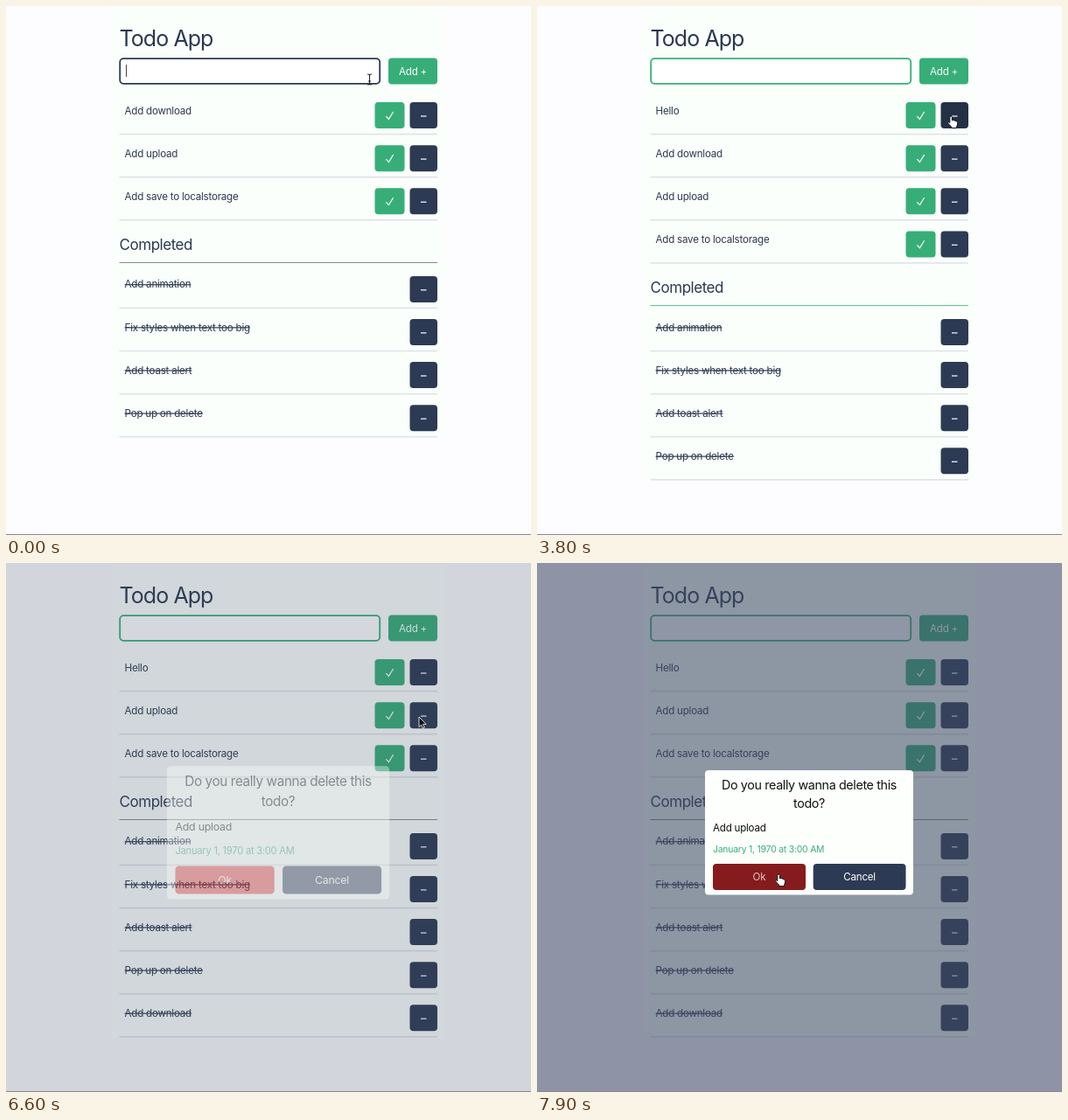
Write an HTML page that moves like this. It is 600 px wide and 605 px high and loops after 8 s.

```html
<!DOCTYPE html>
<html lang="en">
<head>
<meta charset="utf-8">
<title>Todo App</title>
<style>
  html, body { margin: 0; width: 100%; height: 100%; overflow: hidden; background: #fdfcff; }
  svg { display: block; width: 600px; height: 605px; }
  text { font: 11.6px Inter, "Open Sans", sans-serif; letter-spacing: -.02em; fill: #2a3850; white-space: pre; }
  .done { text-decoration: line-through; }
  .btn { fill: #fff; text-anchor: middle; }
</style>
</head>
<body>
<svg id="stage" viewBox="0 0 600 605"></svg>
<script>
const LOOP = 8000, PITCH = 49.1, FADE = 400, SLIDE = -124;
const ADD = 2555, CHECK = 5020, REMOVED = CHECK + FADE, POPUP = 6530;
const NAVY = '#2c3a53', NAVY_HOVER = '#243046';
const GREEN = '#37ae78', GREEN_HOVER = '#2f9868';

const stage = document.getElementById('stage');

function el(parent, tag, attrs = {}, text) {
  const node = document.createElementNS('http://www.w3.org/2000/svg', tag);
  set(node, attrs);
  if (text !== undefined) node.textContent = text;
  parent.appendChild(node);
  return node;
}
function set(node, attrs) {
  for (const k in attrs) node.setAttribute(k, attrs[k]);
}
const rect = (parent, x, y, width, height, fill, rx = 0) =>
  el(parent, 'rect', { x, y, width, height, fill, rx });
const label = (parent, x, y, text, style = '', cls = '') =>
  el(parent, 'text', { x, y, style, class: cls }, text);

const clamp = v => Math.min(1, Math.max(0, v));
const smooth = v => v * v * (3 - 2 * v);

// CSS "ease": cubic-bezier(.25, .1, .25, 1)
function ease(v) {
  v = clamp(v);
  if (v === 0 || v === 1) return v;
  const bez = (a, b, s) => 3 * a * s * (1 - s) ** 2 + 3 * b * s * s * (1 - s) + s ** 3;
  let lo = 0, hi = 1;
  for (let i = 0; i < 24; i++) {
    const mid = (lo + hi) / 2;
    if (bez(.25, .25, mid) < v) lo = mid; else hi = mid;
  }
  return bez(.1, 1, lo);
}

// Page
rect(stage, 0, 0, 600, 605, '#fdfcff');
const card = rect(stage, 121, 0, 381, 494, '#fbfffb');
label(stage, 129.5, 45.5, 'Todo App', 'font-size:25px;letter-spacing:-.037em');
const input = el(stage, 'rect', { x: 130.2, y: 60.2, width: 297, height: 28.6, rx: 4, fill: '#fff', 'stroke-width': 1.8 });
const typed = label(stage, 137, 79, '');
const caret = rect(stage, 137, 67, 1, 14, '#444');
const addBtn = rect(stage, 437, 59.5, 56, 30, GREEN, 4);
const addText = label(stage, 465, 79, 'Add +', '', 'btn');

const heading = el(stage, 'g');
label(heading, 129.5, 279, 'Completed', 'font-size:17px;letter-spacing:-.027em');
const rule = rect(heading, 129.5, 293, 363.5, 1, '#858c8c');

// Rows have their bottom line at y = 0
function makeRow(text, done) {
  const g = el(stage, 'g');
  rect(g, 129.5, -.8, 363.5, 1.6, '#dfe3ea');
  label(g, 135.6, -23, text, '', done ? 'done' : '');
  const check = done ? null : rect(g, 421.5, -36.5, 34, 30, GREEN, 4);
  if (check) {
    el(g, 'path', { d: 'M434.4-20.5l3 3.3 5.2-8.4', fill: 'none', stroke: '#fff', 'stroke-width': 1.2 });
  }
  const minus = rect(g, 461.5, -36.5, 31.5, 30, NAVY, 4);
  rect(g, 474, -21.2, 6.5, 1.2, '#fff');
  return { g, check, minus };
}
const todos = ['Hello', 'Add download', 'Add upload', 'Add save to localstorage'].map(s => makeRow(s, false));
const dones = ['Add animation', 'Fix styles when text too big', 'Add toast alert', 'Pop up on delete', 'Add download']
  .map(s => makeRow(s, true));

// Dialog
const shade = rect(stage, 0, 0, 600, 605, 'rgb(62,74,100)');
const dialog = el(stage, 'g');
rect(dialog, 192, 237, 238, 142.5, '#fdfffc', 4);
const titleStyle = 'font-size:14.3px;letter-spacing:-.025em;text-anchor:middle;fill:#111';
label(dialog, 311, 258.7, 'Do you really wanna delete this', titleStyle);
label(dialog, 311, 279.5, 'todo?', titleStyle);
label(dialog, 201, 306.5, 'Add upload', 'fill:#111');
label(dialog, 201, 331.3, 'January 1, 1970 at 3:00 AM', 'font-size:10.4px;fill:' + GREEN);
const okBtn = rect(dialog, 201, 344, 106, 30, '#e53e3e', 4);
const okText = label(dialog, 254, 363.2, 'Ok', '', 'btn');
rect(dialog, 315.7, 344, 105.8, 30, NAVY, 4);
label(dialog, 368.6, 363.2, 'Cancel', '', 'btn');

rect(stage, 0, 604, 600, 1, '#8d8490');

// Mouse pointers, hotspot at the origin
const shape = (d, fill, stroke, width) =>
  el(stage, 'path', { d, fill, stroke, 'stroke-width': width, 'stroke-linejoin': 'round' });
const pointers = {
  beam: shape('M-2.5-6Q0-6 0-4.5V4.5Q0 6-2.5 6M2.5-6Q0-6 0-4.5M0 4.5Q0 6 2.5 6M-1.5 2H1.5', 'none', '#222', 1.1),
  hand: shape('M-1.2 1.2a1.3 1.3 0 0 1 2.6 0V5l1-.6 1.6.3.5.6 1.5.1.4.7 1 .2.3.8V9l-1 3v1.6H.6V12.2L-3.2 8.2C-4 7-2.6 6.2-1.2 7.6z', '#fff', '#111', 1),
  arrow: shape('M0 0V11.5L2.6 9.2 4.3 13 6.3 12.1 4.6 8.4H8.2Z', '#111', '#fff', .8)
};

// [time, x, y]
const path = [
  [0, 415.5, 84], [1550, 415.5, 84], [1800, 514, 66], [2000, 481, 71], [2350, 479.5, 72],
  [3250, 479.5, 72], [3600, 480, 114], [3800, 473, 126], [3950, 458, 134], [4050, 433, 140],
  [4100, 433, 172], [4350, 433, 172], [4700, 437, 173], [5450, 437, 173], [5800, 457.5, 164],
  [6050, 457.5, 164], [6350, 472, 176], [6900, 472, 176], [7300, 365, 275], [7700, 276, 356], [LOOP, 276, 356]
];
function mouseAt(t) {
  const i = path.findIndex(p => p[0] > t);
  const a = path[i - 1], b = path[i];
  const k = smooth((t - a[0]) / (b[0] - a[0]));
  return [a[1] + (b[1] - a[1]) * k, a[2] + (b[2] - a[2]) * k];
}

const keys = [550, 750, 900, 1050, 1200];

function render(t) {
  const [mx, my] = mouseAt(t);
  const open = t >= POPUP;
  let kind = 'arrow';
  const over = (x, y, w, h) => mx >= x && mx <= x + w && my >= y && my <= y + h;

  const added = ease((t - ADD) / FADE);
  const left = ease((t - CHECK) / FADE);
  const closed = ease((t - REMOVED) / FADE);
  const four = t >= ADD && t < REMOVED;
  const five = t >= CHECK;
  const drop = four ? PITCH : 0;

  // Input and add button
  const n = t < ADD ? keys.filter(k => t >= k).length : 0;
  typed.textContent = 'Hello'.slice(0, n);
  set(caret, { x: 137 + (n ? typed.getComputedTextLength() : 0), opacity: t < 1300 ? 1 : 0 });
  set(input, { stroke: t < 2450 ? NAVY : GREEN });
  if (over(130, 60, 297, 29)) kind = 'beam';
  const onAdd = !open && over(437, 59.5, 56, 30);
  if (onAdd) kind = 'hand';
  set(addBtn, { fill: onAdd ? GREEN_HOVER : GREEN });
  set(addText, { 'fill-opacity': onAdd ? .78 : 1 });

  function place(row, x, y, opacity) {
    set(row.g, { transform: `translate(${x} ${y})`, opacity });
    const hit = (node, bx, w, base, hover) => {
      const on = !open && opacity > 0 && over(bx + x, y - 36.5, w, 30);
      if (on) kind = 'hand';
      set(node, { fill: on ? hover : base });
    };
    if (row.check) hit(row.check, 421.5, 34, GREEN, GREEN_HOVER);
    hit(row.minus, 461.5, 31.5, NAVY, NAVY_HOVER);
  }
  const slot = i => 146.6 + PITCH * i;
  place(todos[0], SLIDE * (1 - added), slot(0), added);
  place(todos[1], SLIDE * left, slot(added), 1 - left);
  place(todos[2], 0, slot(1 + added - closed), 1);
  place(todos[3], 0, slot(2 + added - closed), 1);
  dones.forEach((row, i) => {
    const last = i === 4;
    place(row, last ? SLIDE * (1 - left) : 0, 345.4 + drop + PITCH * i, last ? left : 1);
  });
  set(heading, { transform: `translate(0 ${drop})` });
  set(rule, { fill: four ? '#4fbd8d' : '#858c8c' });
  set(card, { height: 494 + drop + (five ? PITCH : 0) });

  // Dialog
  const shown = ease((t - POPUP) / 300);
  const scale = 1.11 - .11 * shown;
  set(shade, { opacity: .575 * shown });
  set(dialog, { opacity: shown, transform: `translate(311 308) scale(${scale}) translate(-311 -308)` });
  const onOk = open && over(201, 344, 106, 30);
  if (onOk) kind = 'hand';
  set(okBtn, { fill: !onOk ? '#e53e3e' : t < 7900 ? '#9b2022' : '#851b1d' });
  set(okText, { 'fill-opacity': onOk ? .75 : 1 });

  for (const k in pointers) {
    set(pointers[k], { transform: `translate(${mx} ${my})`, visibility: k === kind ? 'visible' : 'hidden' });
  }
}

const start = performance.now();
function tick() {
  render((performance.now() - start) % LOOP);
  requestAnimationFrame(tick);
}
tick();
</script>
</body>
</html>
```
